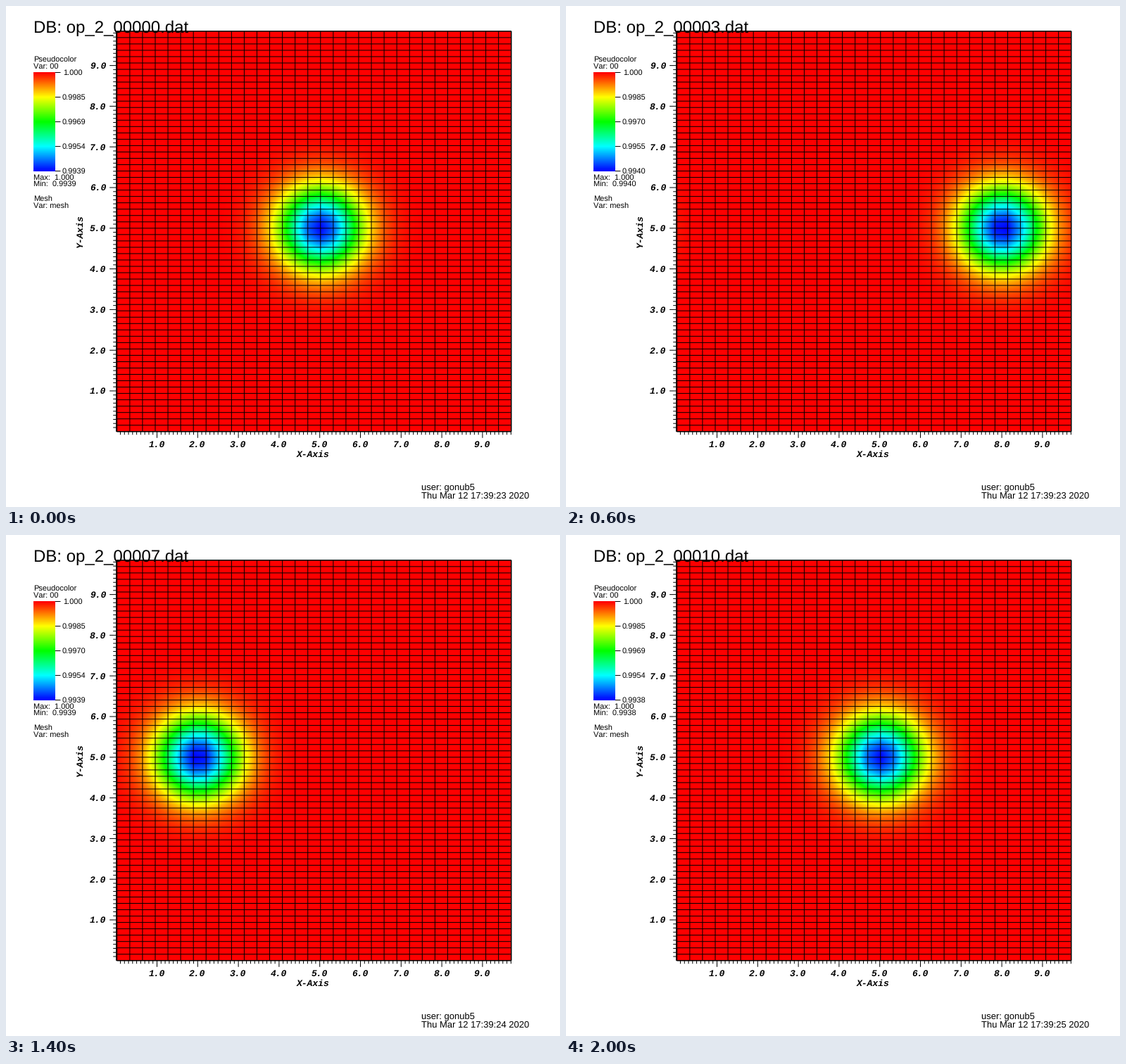
A matplotlib script for the animation above (2200 ms loop, 787x712 px).

```python
import numpy as np
import matplotlib.pyplot as plt
from matplotlib.animation import FuncAnimation
from matplotlib.collections import LineCollection
from matplotlib.colors import LinearSegmentedColormap

W, H, DPI = 787, 712, 100
PX = 72 / DPI                      # points per pixel
FRAMES, INTERVAL = 11, 200

NX, NY, SIZE = 32, 64, 10.0        # mesh nodes and periodic domain length
UNIT = 57.8                        # pixels per data unit
AXIS_X, LEFT, BOTTOM = 156.7, 157.8, 604.8

node_x = np.arange(NX) * SIZE / NX
node_y = np.arange(NY) * SIZE / NY
mesh_x = LEFT + UNIT * node_x
mesh_y = BOTTOM - UNIT * node_y
RIGHT, TOP = mesh_x[-1], mesh_y[-1]

plt.rcParams["text.hinting"] = "none"
plt.rcParams["text.hinting_factor"] = 1
HOT = LinearSegmentedColormap.from_list(
    "hot5", ["#0000ff", "#00ffff", "#00ff00", "#ffff00", "#ff0000"], N=512)

fig = plt.figure(figsize=(W / DPI, H / DPI), dpi=DPI, facecolor="white")
ax = fig.add_axes([0, 0, 1, 1])
ax.set_axis_off()


def label(x, y, s, size, **kw):
    style = dict(family="Liberation Sans", color="black", va="baseline", zorder=5)
    style.update(kw)
    return ax.text(x, y, s, fontsize=size * PX, **style)


def small(x, y, s=""):
    return label(x, y, s, 10.6)


def axis_label(x, y, s, **kw):
    return label(x, y, s, 12.8, family="Liberation Mono", weight="bold",
                 style="italic", **kw)


def lines(segments, width):
    ax.add_collection(LineCollection(segments, colors="black",
                                     linewidths=width * PX, zorder=3, snap=False))


def show(data, extent):
    return ax.imshow(data, cmap=HOT, vmin=0, vmax=1, interpolation="nearest",
                     extent=extent, aspect="auto", zorder=1)


# Field, sampled at pixel centres between mesh nodes
x0, x1, y0, y1 = int(LEFT), round(RIGHT), round(TOP), round(BOTTOM)
pix_x = (np.arange(x0, x1) + 0.5 - LEFT) / UNIT
pix_y = (BOTTOM - np.arange(y0, y1) - 0.5) / UNIT


def bump(nodes, center):
    d = (nodes - center + SIZE / 2) % SIZE - SIZE / 2
    return np.exp(-d ** 2)


def vortex(k):
    """Normalised density field and its minimum after k steps."""
    gx = bump(node_x, (5 + k) % SIZE)
    gy = bump(node_y, 5)
    peak = gx.max() * gy.max()
    field = np.outer(np.interp(pix_y, node_y, gy), np.interp(pix_x, node_x, gx))
    return 1 - field / peak, 1 - (0.00612 + 7e-6 * k) * peak


image = show(vortex(0)[0], (x0, x1, y1, y0))

# Mesh and frame
lines([[(x, TOP), (x, BOTTOM)] for x in mesh_x], 1.0)
lines([[(LEFT, y), (RIGHT, y)] for y in mesh_y], 1.0)
lines([[(AXIS_X, TOP), (AXIS_X, BOTTOM)],
       [(AXIS_X, BOTTOM), (RIGHT, BOTTOM)],
       [(AXIS_X, TOP), (RIGHT, TOP)],
       [(RIGHT, TOP), (RIGHT, BOTTOM)]], 1.2)

# Axis ticks
ticks = []
for i in range(1, 99):
    x, y = AXIS_X + UNIT * i / 10, BOTTOM - UNIT * i / 10
    major = i % 10 == 0
    if x < RIGHT:
        ticks.append([(x, BOTTOM), (x, BOTTOM + (9 if major else 4.5))])
    ticks.append([(AXIS_X, y), (AXIS_X - (9.5 if major else 4.5), y)])
    if major:
        axis_label(x - 0.3, 626.8, f"{i / 10:.1f}", ha="center")
        axis_label(142.3, y + 4.2, f"{i / 10:.1f}", ha="right")
lines(ticks, 1.0)
axis_label(436, 641, "X-Axis", ha="center")
axis_label(105.5, 319.5, "Y-Axis", ha="center", va="center", rotation=90)

# Legend
show(np.linspace(1, 0, 280)[:, None], (39, 70, 235, 94))
bar_y = np.linspace(94.5, 234.6, 5)
lines([[(70, y), (77.5, y)] for y in bar_y], 1.0)
small(81, bar_y[0] + 3.4, "1.000")
bar_labels = [small(80, y + 3.4) for y in bar_y[1:]]
small(39, 79.5, "Pseudocolor")
small(39, 89, "Var: 00")
small(39, 247, "Max:  1.000")
min_label = small(39, 256.5)
small(39, 278, "Mesh")
small(39, 287.5, "Var: mesh")

title = label(39, 38.5, "", 24.1)
label(590, 688, "user: gonub5", 13)
stamp = label(590, 700, "", 12.8)

ax.set_xlim(0, W)
ax.set_ylim(H, 0)


def draw(k):
    field, low = vortex(k)
    image.set_data(field)
    for i, text in enumerate(bar_labels, 1):
        text.set_text(f"{1 - (1 - low) * i / 4:.4f}")
    min_label.set_text(f"Min:  {low:.4f}")
    title.set_text(f"DB: op_2_{k:05d}.dat")
    stamp.set_text(f"Thu Mar 12 17:39:{23 + k // 4} 2020")
    return [image, *bar_labels, min_label, title, stamp]


anim = FuncAnimation(fig, draw, frames=FRAMES, interval=INTERVAL,
                     init_func=lambda: draw(0), repeat=True, repeat_delay=0)
plt.show()
```
